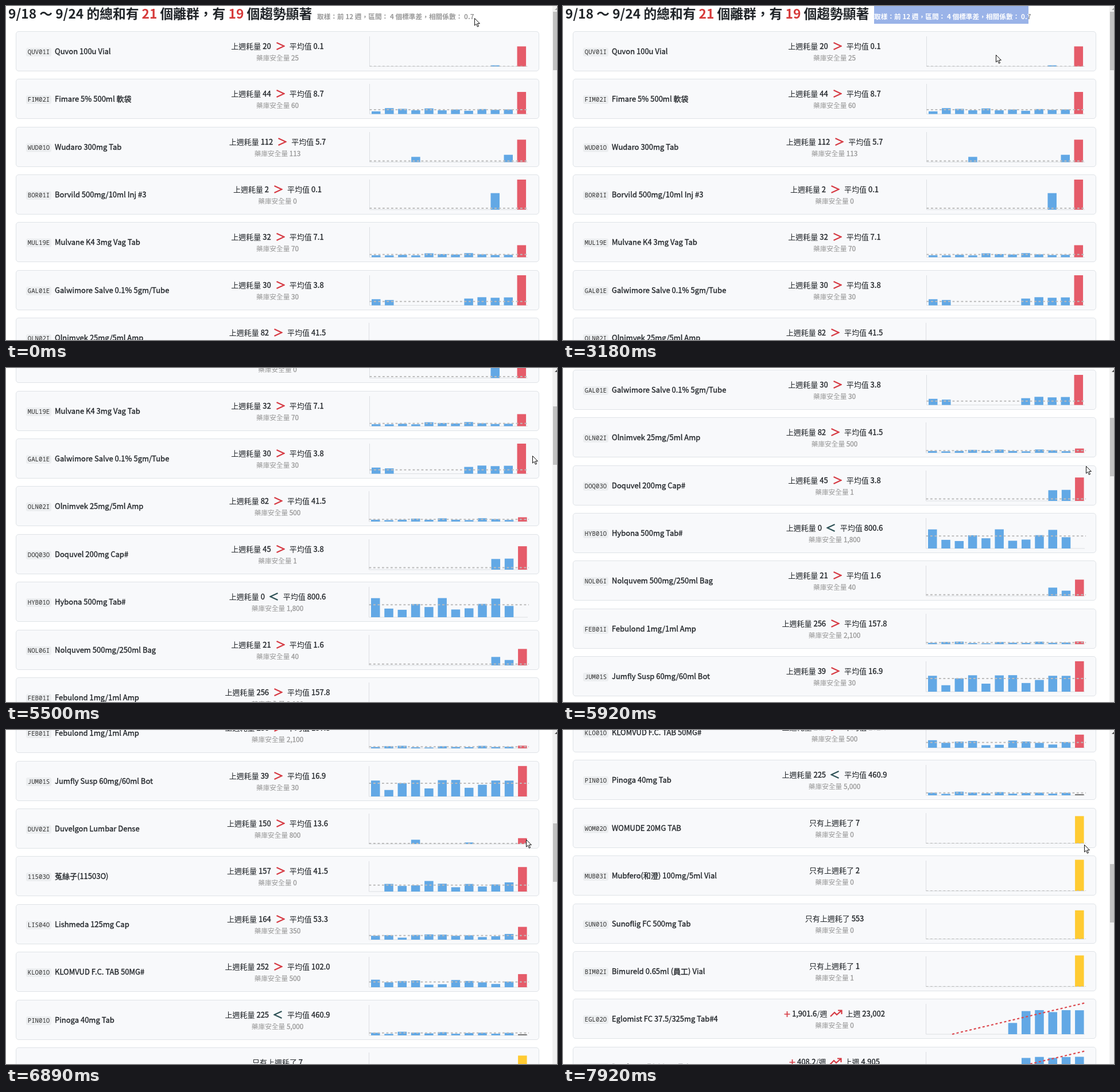
An HTML page that plays this animation: 960x583 px, repeating every 7990 ms.

```html
<!DOCTYPE html>
<html lang="zh-Hant">
<head>
<meta charset="utf-8">
<style>
html, body { margin: 0; width: 100%; height: 100%; overflow: hidden; background: #fff; }
body { position: relative; font: 13px/20px "Noto Sans CJK TC", "Noto Sans CJK", sans-serif; color: #212529; }
body * { box-sizing: border-box; white-space: nowrap; }
h1, .note, .row, .row > *, #bar, #thumb, #up, #cursor { position: absolute; }
h1 { margin: 0; left: 4px; top: -4px; font-size: 22.75px; line-height: 34px; }
h1 i { font-style: normal; color: #d63a3a; }
b, .name { font-weight: 400; -webkit-text-stroke: .35px; }
.note { left: 542px; top: 0; width: 269px; height: 31px; font-size: 11.7px; line-height: 35px; font-weight: 700; color: #999; }
#selected { background: #9ab3e8; color: #fff; }
.row { left: 17px; width: 912px; height: 70px; background: #f8f9fb; border: 1px solid #dfe3e7; border-radius: 5px; }
.code { left: 17px; top: 28px; width: 44px; height: 15px; border-radius: 3px; background: #eceef0; text-align: center;
  font: 10.7px/15px "Noto Sans Mono", monospace; color: #333; }
.name { left: 67px; top: 24px; }
.use, .stock { left: 305px; width: 300px; text-align: center; }
.use { top: 15px; }
.use svg { vertical-align: -2px; fill: none; stroke: #d63a43; stroke-width: 2.2; }
.stock { top: 35px; font-size: 11.7px; color: #999; }
.chart { left: 0; top: -1px; }
#bar { left: 952px; top: 0; width: 8px; height: 583px; background: #f1f1f1; }
#thumb { left: 953px; top: 10px; width: 7px; height: 102px; background: #c1c1c1; }
#up { left: 955px; top: 2px; }
#cursor { left: 0; top: 0; overflow: visible; }
</style>
</head>
<body>
<div id="page">
  <h1>9/18 ～ 9/24 的總和有 <i>21</i> 個離群，有 <i>19</i> 個趨勢顯著</h1>
  <div class="note">取樣：前 12 週，區間： 4 個標準差，相關係數： 0.7</div>
  <div class="note" id="selected">取樣：前 12 週，區間： 4 個標準差，相關係數： 0.7</div>
</div>
<div id="bar"></div><div id="thumb"></div>
<svg id="up" width="5" height="6"><path d="M1 5L5 1V5Z"/></svg>
<svg id="cursor" width="12" height="18">
  <path id="arrow" d="M.5 .5V13L3.4 10.3L5.4 15.2L7.5 14.3L5.4 9.6H9.4Z" fill="#fff" stroke="#111"/>
  <path id="beam" d="M-3 .5H-1L0 1.5L1 .5H3M0 1.5V14.5M-3 15.5H-1L0 14.5L1 15.5H3" fill="none" stroke="#222"/>
</svg>
<script>
const BLUE = '#62a8e5', RED = '#e55c6a', YELLOW = '#ffcb32', GREY = '#777';
const PAST = 11;
const $ = id => document.getElementById(id);
const random = n => { const v = Math.sin(n * 12.9898) * 43758.5453; return v - Math.floor(v); };
const range = (from, to) => Array.from({ length: to - from + 1 }, (_, i) => from + i);
const bold = (n, digits = 0) =>
  `<b>${n.toLocaleString('en-US', { minimumFractionDigits: digits })}</b>`;
const icon = (w, h, d, style = '') => `<svg width="${w}" height="${h}" style="${style}"><path d="${d}"/></svg>`;
const greater = icon(16, 14, 'M1.5 1L14.5 7L1.5 13', 'margin:0 8px');
const less = icon(16, 14, 'M14.5 1L1.5 7L14.5 13', 'margin:0 8px;stroke:#2f5257');
const plus = icon(11, 12, 'M5.5 1V11M.5 6H10.5', 'margin-right:3px;stroke-width:1.7');
const rise = icon(22, 14, 'M1 12L8 5L12 9L20 2M14 1.5H20.5V8', 'margin:0 5px');

// last week's use, weekly mean, safety stock, weeks with any use, weekly growth
const rows = [
  { code: 'QUV01I', name: 'Quvon 100u Vial', last: 20, mean: .1, stock: 25, weeks: [9] },
  { code: 'FIM02I', name: 'Fimare 5% 500ml 軟袋', last: 44, mean: 8.7, stock: 60 },
  { code: 'WUD01O', name: 'Wudaro 300mg Tab', last: 112, mean: 5.7, stock: 113, weeks: [3, 10] },
  { code: 'BOR01I', name: 'Borvild 500mg/10ml Inj #3', last: 2, mean: .1, stock: 0, weeks: [9] },
  { code: 'MUL19E', name: 'Mulvane K4 3mg Vag Tab', last: 32, mean: 7.1, stock: 70 },
  { code: 'GAL01E', name: 'Galwimore Salve 0.1% 5gm/Tube', last: 30, mean: 3.8, stock: 30, weeks: [0, 1, ...range(7, 10)] },
  { code: 'OLN02I', name: 'Olnimvek 25mg/5ml Amp', last: 82, mean: 41.5, stock: 500 },
  { code: 'DOQ03O', name: 'Doquvel 200mg Cap#', last: 45, mean: 3.8, stock: 1, weeks: [9, 10] },
  { code: 'HYB01O', name: 'Hybona 500mg Tab#', last: 0, mean: 800.6, stock: 1800 },
  { code: 'NOL06I', name: 'Nolquvem 500mg/250ml Bag', last: 21, mean: 1.6, stock: 40, weeks: [9, 10] },
  { code: 'FEB01I', name: 'Febulond 1mg/1ml Amp', last: 256, mean: 157.8, stock: 2100 },
  { code: 'JUM01S', name: 'Jumfly Susp 60mg/60ml Bot', last: 39, mean: 16.9, stock: 30 },
  { code: 'DUV02I', name: 'Duvelgon Lumbar Dense', last: 150, mean: 13.6, stock: 800, weeks: [3, 7] },
  { code: '11503O', name: '菟絲子(11503O)', last: 157, mean: 41.5, stock: 0, weeks: range(1, 10) },
  { code: 'LIS04O', name: 'Lishmeda 125mg Cap', last: 164, mean: 53.3, stock: 350 },
  { code: 'KLO01O', name: 'KLOMVUD F.C. TAB 50MG#', last: 252, mean: 102, stock: 500 },
  { code: 'PIN01O', name: 'Pinoga 40mg Tab', last: 225, mean: 460.9, stock: 5000 },
  { code: 'WOM02O', name: 'WOMUDE 20MG TAB', last: 7, stock: 0 },
  { code: 'MUB03I', name: 'Mubfero(和澄) 100mg/5ml Vial', last: 2, stock: 0 },
  { code: 'SUN01O', name: 'Sunoflig FC 500mg Tab', last: 553, stock: 0 },
  { code: 'BIM02I', name: 'Bimureld 0.65ml (員工) Vial', last: 1, stock: 1 },
  { code: 'EGL02O', name: 'Eglomist FC 37.5/325mg Tab#4', last: 23002, stock: 0, growth: 1901.6 },
  { code: 'DWE01O', name: 'Dwelpora FC 20mg Tab', last: 4905, stock: 0, growth: 408.2 }
];

function usage({ last, mean, growth }) {
  if (growth) return `${plus}${bold(growth)}/週${rise}上週 ${bold(last)}`;
  if (!mean) return `只有上週耗了 ${bold(last)}`;
  return `上週耗量 ${bold(last)}${last > mean ? greater : less}平均值 ${bold(mean, 1)}`;
}

// Past weeks vary at random around the row's mean
function history({ last, mean = 0, growth, weeks = range(0, 10) }, seed) {
  if (growth) return range(0, 10).map(w => w < 6 ? 0 : last * (w === 6 ? .47 : .92 + .14 * random(seed + w)));
  const weights = range(0, 10).map(w => weeks.includes(w) ? .5 + random(seed + w) : 0);
  const sum = weights.reduce((a, b) => a + b);
  return weights.map(w => w / sum * mean * PAST);
}

// Top of the axis: at most four steps of 1, 2 or 5 times a power of ten
function axisTop(max) {
  const power = 10 ** Math.floor(Math.log10(max / 4));
  const step = power * [1, 2, 5, 10].find(n => n * power >= max / 4);
  return Math.ceil(max / step) * step;
}

function chart(row, index) {
  const { last, mean = 0, stock, growth } = row;
  const wide = index > 5, base = wide ? 62 : 61.5, height = wide ? 54.5 : 52.5;
  const axis = wide ? 614.5 : 615.5, step = wide ? 23.28 : 23.05;
  const scale = height / axisTop(Math.max(last, stock, mean));
  const lastColor = growth ? BLUE : !mean ? YELLOW : last > mean ? RED : GREY;
  const bars = [...history(row, index * 12), last].map((value, i) => {
    const h = value * scale;
    return `<rect x="${axis + 3.5 + i * step}" y="${base - h}" width="15.5" height="${h}" fill="${i < PAST ? BLUE : lastColor}"/>`;
  }).join('');
  const level = mean * scale;
  const line = growth
    ? `<path d="M660 ${base}L893 7" stroke="#dc4a50" stroke-width="2.2" stroke-dasharray="4 3.75"/>`
    : `<path d="M${axis} ${base - Math.max(level, .5)}H893" stroke="#bcbcbc" stroke-width="${Math.min(2, 1 + level)}" stroke-dasharray="3.75"/>`;
  return `<svg class="chart" width="910" height="70" fill="none">
    <path d="M${axis} 9V${base}H891" stroke="#dcdfe2"/>${bars}${line}</svg>`;
}

const cards = rows.map((row, i) => {
  const card = document.createElement('div');
  card.className = 'row';
  card.innerHTML = `<span class="code">${row.code}</span><span class="name">${row.name}</span>
    <div class="use">${usage(row)}</div><div class="stock">藥庫安全量 ${bold(row.stock)}</div>${chart(row, i)}`;
  $('page').append(card);
  return card;
});

// Time, then position
const LOOP = 7990;
const pointer = [
  [200, 816, 21], [970, 592, 17], [1250, 536, 14], [1800, 330, 76], [2000, 330, 76], [2250, 211, 77],
  [2630, 346, 76], [3460, 900, 88], [3750, 849, 76], [4000, 908, 94], [4370, 880, 92],
  [5500, 917, 153], [6340, 905, 188], [7920, 908, 200]
];
const wheel = [[4700, 0], [5500, 337.5], [6340, 577.8], [6890, 907], [7920, 1325.7]];

function at(keys, t, ease = u => u) {
  const next = keys.findIndex(key => key[0] > t);
  if (next < 1) return (next ? keys[keys.length - 1] : keys[0]).slice(1);
  const a = keys[next - 1], b = keys[next], u = ease((t - a[0]) / (b[0] - a[0]));
  return a.slice(1).map((v, i) => v + (b[i + 1] - v) * u);
}

function draw(now) {
  const t = now % LOOP;
  const [x, y] = at(pointer, t, u => u * u * (3 - 2 * u)).map(Math.round);
  const [scroll] = at(wheel, t);
  document.querySelectorAll('h1, .note').forEach(e => e.style.transform = `translateY(${-Math.round(scroll)}px)`);
  cards.forEach((card, i) => card.style.top = Math.round(43.7 + 83.4 * i - scroll) + 'px');
  const edge = t > 1250 ? 0 : Math.min(269, Math.max(0, x - 542));
  $('selected').style.clipPath = `inset(0 0 0 ${edge}px)`;
  $('thumb').style.top = 10 + scroll * .169 + 'px';
  $('up').style.fill = scroll ? '#505050' : '#a8a8a8';
  const typing = y < 31 && x > 536 && x < 811;
  $('arrow').style.display = typing ? 'none' : '';
  $('beam').style.display = typing ? '' : 'none';
  $('cursor').style.transform = `translate(${x}px, ${y}px)`;
  requestAnimationFrame(draw);
}
requestAnimationFrame(draw);
</script>
</body>
</html>
```
